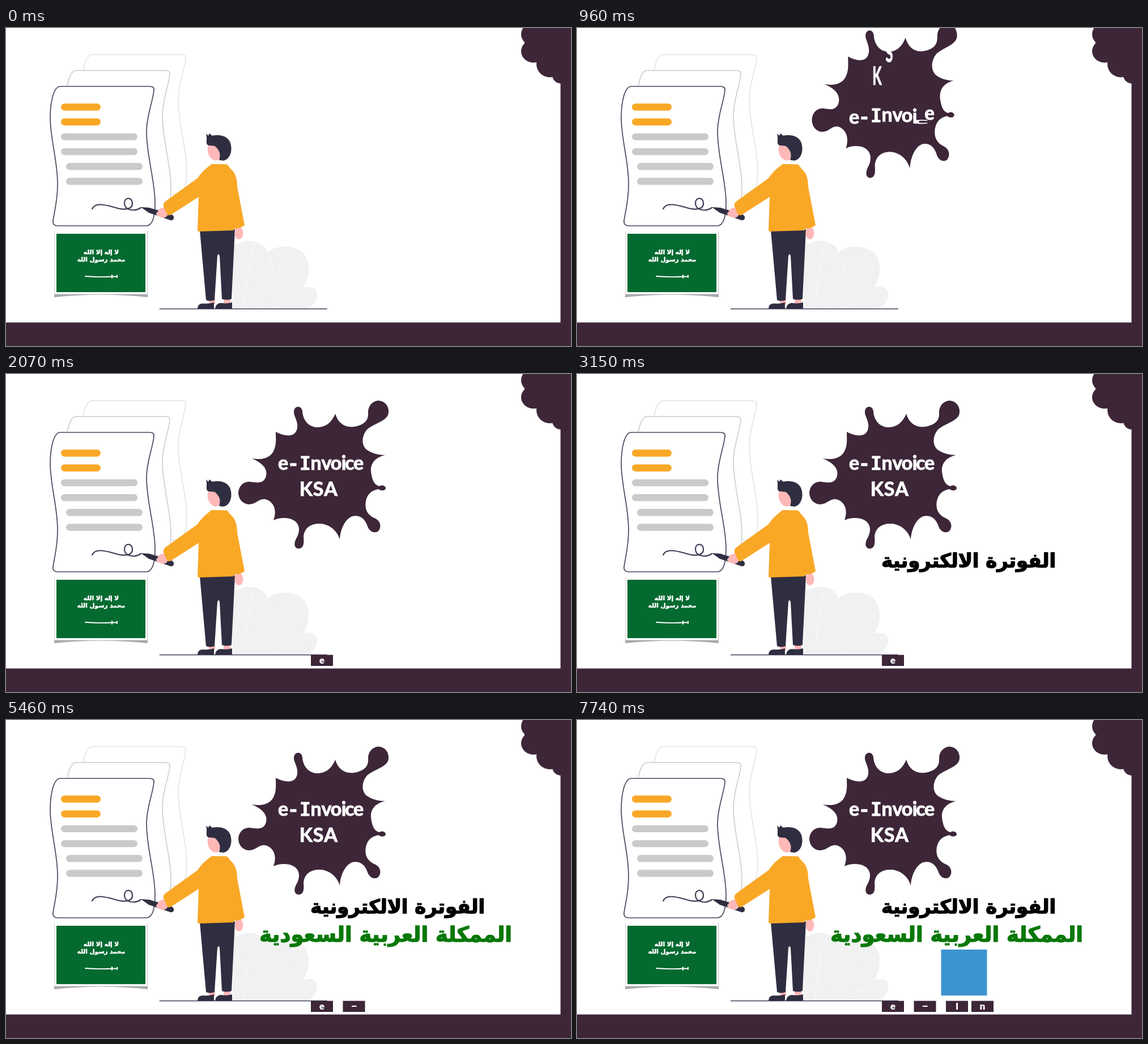
Recreate the animation shown at these times as an HTML page with a canvas. Size 997x561 px, loop 8 s.

```html
<!DOCTYPE html>
<html lang="en">
<head>
<meta charset="utf-8">
<title>e-Invoice</title>
<style>
  html, body { margin: 0; width: 100%; height: 100%; overflow: hidden; background: #fff; }
  canvas { display: block; }
</style>
</head>
<body>
<canvas id="stage" width="997" height="561"></canvas>
<script>
const ctx = document.getElementById('stage').getContext('2d');
const LOOP = 8000;
const PLUM = '#3c2638', INK = '#2f2e41', LINE = '#3f3d56', ORANGE = '#f9a826',
      SKIN = '#ffb8b8', GREY = '#cacaca';
const LATIN = '"Comic Sans MS", "Comic Neue", Lato, sans-serif';
const MONO = '"Noto Sans Mono", monospace';
const ARABIC = '"DejaVu Sans", sans-serif';

const clamp = v => Math.max(0, Math.min(1, v));
const progress = (t, start, length) => clamp((t - start) / length);

function fill(d, color) {
  ctx.fillStyle = color;
  ctx.fill(new Path2D(d));
}
function stroke(d, color, width) {
  ctx.strokeStyle = color;
  ctx.lineWidth = width;
  ctx.lineCap = ctx.lineJoin = 'round';
  ctx.stroke(new Path2D(d));
}
function oval(x, y, rx, ry, color, turn = 0) {
  ctx.fillStyle = color;
  ctx.beginPath();
  ctx.ellipse(x, y, rx, ry, turn, 0, Math.PI * 2);
  ctx.fill();
}
function box(x, y, w, h, color) {
  ctx.fillStyle = color;
  ctx.fillRect(x, y, w, h);
}
// Text with a thin outline in its own colour, for heavy rounded letters.
function heavyText(text, x, y, color, outline) {
  ctx.fillStyle = ctx.strokeStyle = color;
  ctx.lineWidth = outline;
  ctx.lineJoin = 'round';
  ctx.fillText(text, x, y);
  ctx.strokeText(text, x, y);
}
// Runs a drawing with its own saved canvas state.
function scoped(draw) {
  ctx.save();
  draw();
  ctx.restore();
}

function drawBorder() {
  box(978.5, 0, 18.5, 561, PLUM);
  box(0, 519.5, 997, 41.5, PLUM);
  fill('M915 0H997V98H979L938 60L915 27Z', PLUM);
  oval(928, 11, 19, 19, PLUM);
  oval(931, 41, 22, 20, PLUM);
  oval(960, 64, 24, 23, PLUM);
  oval(979, 83, 15, 15, PLUM);
}

const PAPER = `M96 103H253Q262 103 261 110C259 130 248 155 248 183C248 225 263 270 263 308
  C263 327 261 348 248 349H92Q82 349 83 340C86 320 91 305 91 275C91 235 79 200 78 160
  C78 130 84 103 96 103Z`;

function drawPapers() {
  [[56, '#e2e2e2', 1.5], [28, GREY, 1.5], [0, '#4b465c', 1.7]].forEach(([shift, color, width]) =>
    scoped(() => {
      ctx.translate(shift, -shift);
      fill(PAPER, '#fff');
      stroke(PAPER, color, width);
    }));
  [[97, 167, ORANGE], [97, 167, ORANGE], [97, 232, GREY], [97, 232, GREY],
   [106, 241, GREY], [106, 241, GREY]].forEach(([left, right, color], row) => {
    const y = 139.5 + row * 26.2;
    stroke(`M${left + 6.2} ${y}H${right - 6.2}`, color, 12.4);
  });
  stroke(`M152 319C157 308 172 311 190 316C208 322 224 321 223 308C222 298 209 298 209 309
    C209 321 226 325 238 317`, LINE, 2.2);
}

function drawFlag() {
  fill('M85 467H250V475Q168 466 85 475Z', '#a9a9b0');
  box(85, 358, 165.5, 112, '#d6d6d6');
  box(86, 356, 163, 113, '#fff');
  box(89, 363, 157, 103, '#046a30');
  ctx.textAlign = 'center';
  ctx.direction = 'rtl';
  ctx.font = 'bold 10.5px ' + ARABIC;
  heavyText('لا إله إلا الله', 168, 399, '#fff', 0.6);
  heavyText('محمد رسول الله', 168, 412, '#fff', 0.6);
  stroke('M140 438Q165 440 187 438.5', '#fff', 1.8);
  stroke('M187 436V441M188 438.5H196M196 436.5V440', '#fff', 2);
}

function drawBush() {
  fill(`M400 495V385Q425 370 443 378Q458 383 461 396Q476 383 500 386Q531 391 534 420
    Q535 444 524 458Q548 453 549 470Q548 489 530 495Z`, '#f1f1f1');
  stroke(`M420 495Q424 440 436 384M424 450L408 415M428 425L449 398M445 495Q470 430 515 395
    M474 442L466 404M490 420L524 424M470 495Q500 472 542 464M498 477L522 487`, '#fafafa', 1);
}

function drawPerson() {
  stroke('M271.5 495.5H566', LINE, 1.7);
  box(358, 478, 11, 9, SKIN);
  box(384, 477, 12, 9, SKIN);
  fill('M338 495Q338 486 348 486Q358 487 367 484V495Z', INK);
  fill('M369 495Q370 486 379 485Q390 487 399 484V495Z', INK);
  fill('M342 357L404 355L398 478Q390 481 381 478L377 402Q375 396 373 402L368 480Q360 483 353 480Z', INK);
  oval(411, 362, 7.5, 11, SKIN);
  oval(368, 217, 12, 17, SKIN, -0.25);
  fill(`M353 186L357 190L359 186L364 190C376 187 392 190 396 203C400 216 396 231 384 234
    L376 233C380 222 376 214 368 208L357 207C351 204 356 197 353 186Z`, INK);
  fill('M238 316L253 317L293 329.500Q297 332 296 336Q294 340 290 339L252 326Z', INK);
  oval(277, 326, 9.5, 9, SKIN);
  oval(270, 328, 5, 4, SKIN);
  fill(`M363 240L390 240.500L397 249Q408 258 408 280L421 348Q413 354 402 354V357L340 359
    Q338 359 338 355L340 298L290 330Q286 332 283 326L278 315Q277 309 281 306L338 265
    Q346 252 363 240Z`, ORANGE);
}

const SPLASH = `M476 102C492 110 508 112 513 99C518 86 507 74 508 66C509 55 522 55 523 66
  C524 80 532 92 547 94C564 95 575 85 581 70C586 88 600 95 614 93C632 90 640 82 639 68
  C639 55 648 47 658 47C670 48 676 58 675 68C674 83 649 87 637 98C627 110 627 126 637 134
  C646 140 657 143 669 143C652 147 643 157 644 172C646 188 650 196 659 198
  C665 194 671 199 670 202C668 207 661 206 657 203C647 205 638 210 635 224
  C632 241 640 250 652 255C662 260 663 272 656 278C647 282 640 276 637 266
  C632 253 622 248 611 251C598 256 590 274 589 292C585 278 573 266 556 264
  C538 263 527 271 525 286C526 298 526 308 516 308C507 307 508 296 514 287
  C521 272 516 259 500 255C490 253 480 254 472 258C478 242 474 228 461 222
  C446 217 444 230 428 230C417 229 410 220 410 209C411 197 419 190 430 190
  C441 191 452 195 458 183C464 168 452 156 433 149C450 152 464 149 471 138C478 126 476 114 476 102Z`;

function drawSplash(t) {
  if (t < 570) return;
  const left = 1 - progress(t, 570, 750);
  const stretch = 0.04 * clamp((left - 0.16) / 0.32);
  scoped(() => {
    ctx.translate(542.5, 183 - 330 * left ** 2.6);
    ctx.scale(1 - stretch * 0.85, 1 + stretch);
    ctx.translate(-542.5, -183);
    fill(SPLASH, PLUM);
  });
}

// A letter falls stretched, flattens as it lands, then hops once.
function drawLetter(char, x, baseline, sinceLanding, hop) {
  const FALL = 100, SQUASH = 50, HOP = 160;
  if (sinceLanding < -FALL) return;
  let lift = 0, flat = 0;
  if (sinceLanding < 0) {
    const p = 1 + sinceLanding / FALL;
    lift = 155 * (1 - p * p);
    flat = -0.3 * clamp(lift / 60);
  } else if (sinceLanding < SQUASH) {
    flat = 0.6 * Math.sin(Math.PI * sinceLanding / SQUASH);
  } else {
    lift = hop * Math.sin(Math.PI * progress(sinceLanding, SQUASH, HOP));
  }
  scoped(() => {
    ctx.translate(x, baseline - lift);
    ctx.scale(1 + flat, 1 - flat);
    ctx.font = 'bold 34px ' + ('I-'.includes(char) ? MONO : LATIN);
    heavyText(char, 0, 0, '#fff', 1);
  });
}

function drawTitle(t) {
  ctx.textAlign = 'center';
  ctx.direction = 'ltr';
  [489, 507, 528, 547, 565.5, 582.5, 596, 606.5, 622].forEach((x, i) =>
    drawLetter('e-Invoice'[i], x, 168.5, t - 723 - i * 30, 4));
  [529.5, 551, 573].forEach((x, i) =>
    drawLetter('KSA'[i], x, 214.5, t - 1010 - i * 50, 10));
}

function makeLine(text, left, right, baseline, color, start) {
  ctx.font = 'bold 100px ' + ARABIC;
  const width = right - left;
  const size = 100 * width / ctx.measureText(text).width;
  return { text, right, width, baseline, color, start, font: `bold ${size}px ${ARABIC}` };
}
const lines = [
  makeLine('الفوترة الالكترونية', 537, 845, 341, '#000', 2580),
  makeLine('الممكلة العربية السعودية', 447, 893, 391, '#087808', 4380)
];

// The line unrolls from the right; its newest part is still narrow.
function drawLine(line, t) {
  const ms = t - line.start;
  if (ms < 0) return;
  const { text, right, width, baseline, color } = line;
  const done = width * progress(ms, 130, 440);
  const strip = Math.min(width - done, 55 * progress(ms, 0, 130));
  const edge = right - done;
  ctx.font = line.font;
  ctx.textAlign = 'right';
  ctx.direction = 'rtl';
  const write = () => heavyText(text, right, baseline, color, 1.5);
  if (ms >= 570) return write();
  const part = (from, to, narrow) => scoped(() => {
    ctx.translate(edge, 0);
    ctx.scale(narrow, 1);
    ctx.translate(-edge, 0);
    ctx.beginPath();
    ctx.rect(from, baseline - 50, to - from, 75);
    ctx.clip();
    write();
  });
  part(edge, right + 2, 1);
  part(edge - strip, edge, 0.45);
}

function drawMark(t) {
  const p = progress(t, 5460, 810);
  if (!p) return;
  const side = 81 * (0.5 + 0.5 * p);
  ctx.globalAlpha = p;
  box(683 - side / 2, 445.5 - side / 2, side, side, '#3d93cf');
  ctx.globalAlpha = 1;
}

function drawTags(t) {
  ctx.textAlign = 'center';
  ctx.direction = 'ltr';
  ctx.font = '900 17px Roboto, sans-serif';
  [['e', 538, 1860], ['–', 594.5, 3660], ['I', 651, 6810], ['n', 696, 7530]]
    .forEach(([char, x, start]) => {
      ctx.globalAlpha = progress(t, start - 30, 240);
      box(x, 495.5, 39, 19.5, PLUM);
      ctx.fillStyle = '#fff';
      ctx.fillText(char, x + 19.5, 511);
    });
  ctx.globalAlpha = 1;
}

function render(t) {
  box(0, 0, 997, 561, '#fff');
  drawBorder();
  drawPapers();
  drawFlag();
  drawBush();
  drawPerson();
  drawSplash(t);
  drawTitle(t);
  lines.forEach(line => drawLine(line, t));
  drawMark(t);
  drawTags(t);
}

const origin = performance.now();
function tick() {
  render((performance.now() - origin) % LOOP);
  requestAnimationFrame(tick);
}
tick();
</script>
</body>
</html>
```
